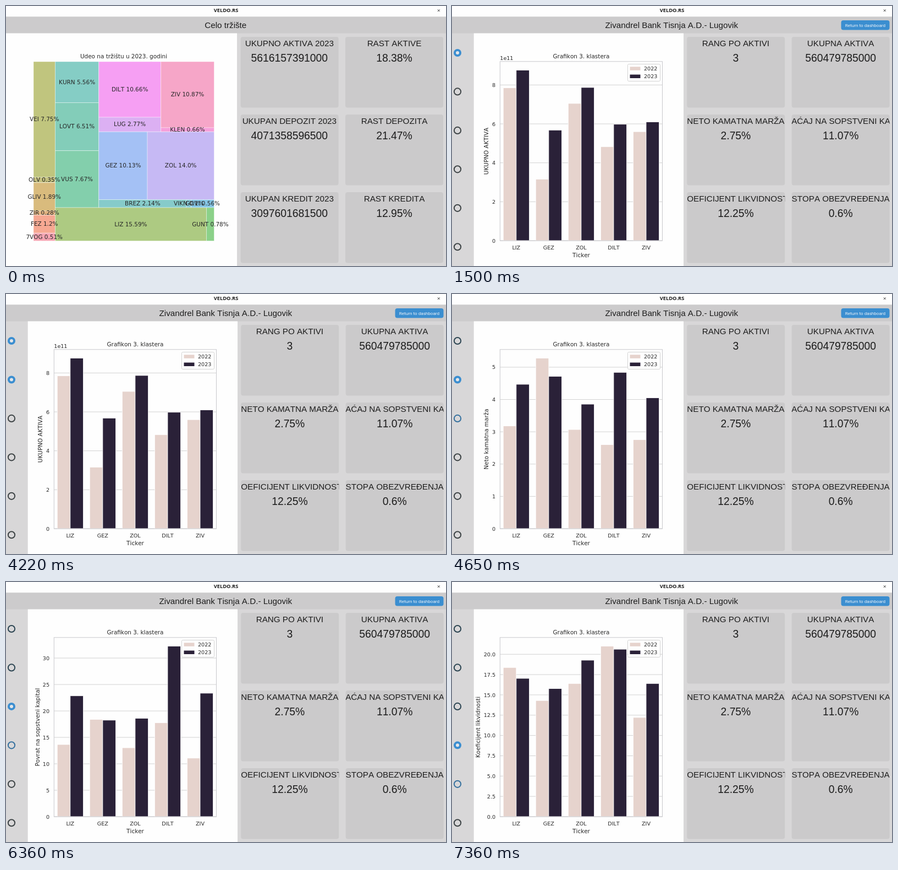
An HTML page with a canvas that plays this animation: 800 by 472 pixels, repeating every 8000 ms.

```html
<!DOCTYPE html>
<html lang="sr">
<head>
<meta charset="utf-8">
<title>Dashboard</title>
<style>
html, body { margin: 0; width: 100%; height: 100%; overflow: hidden; background: #fdfdfd; }
canvas { display: block; }
</style>
</head>
<body>
<canvas id="stage" width="800" height="472"></canvas>
<script>
const ctx = document.getElementById('stage').getContext('2d');
const LOOP = 8000;
const SANS = '"Liberation Sans", Arial, sans-serif';
const PLOT = '"DejaVu Sans", sans-serif';
const LIGHT = '#e6d3cd', DARK = '#2a2138', BLUE = '#3b8ed0', INK = '#262626';
const TICKERS = ['LIZ', 'GEZ', 'ZOL', 'DILT', 'ZIV'];

// name, share, left, top, right, bottom, colour
const TILES = [
  ['VEI', '7.75', 50, 101, 89.4, 311, '#c0c57e'],
  ['OLV', '0.35', 50, 311, 89.4, 320.7, '#c4c07e'],
  ['GLIV', '1.89', 50, 320.7, 89.4, 372, '#d9bb7d'],
  ['ZIR', '0.28', 50, 372, 89.4, 379.6, '#e0b280'],
  ['FEZ', '1.2', 50, 379.6, 89.4, 412.2, '#f6a892'],
  ['7VOG', '0.51', 50, 412.2, 89.4, 426.5, '#f6a5b3'],
  ['KURN', '5.56', 89.4, 101, 168.7, 175.5, '#85cdc5'],
  ['LOVT', '6.51', 89.4, 175.5, 168.7, 262.7, '#83cdb9'],
  ['VUS', '7.67', 89.4, 262.7, 168.7, 366, '#83cfac'],
  ['DILT', '10.66', 168.7, 101, 281.5, 202, '#f69ff3'],
  ['LUG', '2.77', 168.7, 202, 281.5, 228.3, '#dcb0f3'],
  ['ZIV', '10.87', 281.5, 101, 378.4, 221, '#f8b1d0'],
  ['KLEN', '0.66', 281.5, 221, 378.4, 228.3, '#f69fda'],
  ['GEZ', '10.13', 168.7, 228.3, 257, 351.6, '#a4c1f5'],
  ['ZOL', '14.0', 257, 228.3, 378.4, 351.6, '#c6b9f4'],
  ['BREZ', '2.14', 168.7, 351.6, 328, 366, '#86cbca'],
  ['VIKN', '0.1', 328, 351.6, 336.5, 366, '#86c8d6'],
  ['GOVI', '0.56', 336.5, 351.6, 378.4, 366, '#86c6e6'],
  ['LIZ', '15.59', 89.4, 366, 364.5, 426.5, '#adca82'],
  ['GUNT', '0.78', 364.5, 366, 378.4, 426.5, '#8bd189']
];

const CHARTS = [
  { at: 1500, label: 'UKUPNO AKTIVA', x: 62, step: 2, digits: 0, exp: '1e11',
    values: [7.85, 8.76, 3.16, 5.68, 7.05, 7.87, 4.83, 5.98, 5.6, 6.1] },
  { at: 4360, label: 'Neto kamatna marža', x: 62, step: 1, digits: 0,
    values: [3.18, 4.47, 5.28, 4.715, 3.07, 3.855, 2.6, 4.84, 2.755, 4.05] },
  { at: 5650, label: 'Povrat na sopstveni kapital', x: 56.5, step: 5, digits: 0,
    values: [13.65, 22.85, 18.4, 18.25, 13.03, 18.6, 17.75, 32.25, 11.07, 23.35] },
  { at: 6930, label: 'Koeficijent likvidnosti', x: 47, step: 2.5, digits: 1,
    values: [18.37, 17.03, 14.3, 15.77, 16.4, 19.27, 21, 20.62, 12.22, 16.4] }
];
const HOVERS = [0, 3220, 4650, 6360, 7360];
const SELECTS = [1500, 4220, 5650, 6930];

const MARKET = [
  ['UKUPNO AKTIVA 2023', '5616157391000'], ['RAST AKTIVE', '18.38%'],
  ['UKUPAN DEPOZIT 2023', '4071358596500'], ['RAST DEPOZITA', '21.47%'],
  ['UKUPAN KREDIT 2023', '3097601681500'], ['RAST KREDITA', '12.95%']
];
const BANK = [
  ['RANG PO AKTIVI', '3'], ['UKUPNA AKTIVA', '560479785000'],
  ['NETO KAMATNA MARŽA', '2.75%'], ['POVRAĆAJ NA SOPSTVENI KAPITAL', '11.07%'],
  ['KOEFICIJENT LIKVIDNOSTI', '12.25%'], ['STOPA OBEZVREĐENJA', '0.6%']
];

function rect(x, y, w, h, color) {
  ctx.fillStyle = color;
  ctx.fillRect(x, y, w, h);
}

function round(x, y, w, h, r, color) {
  ctx.beginPath();
  ctx.roundRect(x, y, w, h, r);
  ctx.fillStyle = color;
  ctx.fill();
}

function frame(x, y, w, h, color, width = 1) {
  ctx.strokeStyle = color;
  ctx.lineWidth = width;
  ctx.strokeRect(x, y, w, h);
}

function text(str, x, y, font, align = 'center', color = '#1c1c1c') {
  ctx.font = font;
  ctx.textAlign = align;
  ctx.fillStyle = color;
  ctx.fillText(str, x, y);
}

function circle(x, y, r, fill, stroke) {
  ctx.beginPath();
  ctx.arc(x, y, r, 0, 7);
  if (fill) { ctx.fillStyle = fill; ctx.fill(); }
  if (stroke) { ctx.strokeStyle = stroke; ctx.lineWidth = 2; ctx.stroke(); }
}

function line(x1, y1, x2, y2, color) {
  ctx.beginPath();
  ctx.moveTo(x1, y1);
  ctx.lineTo(x2, y2);
  ctx.strokeStyle = color;
  ctx.lineWidth = 1;
  ctx.stroke();
}

function drawTreemap(t) {
  text('Udeo na tržištu u 2023. godini', 214, 95, `10.44px ${PLOT}`, 'center', INK);
  for (const [name, , x, y, r, b, color] of TILES) {
    rect(x, y, r - x, b - y, name === 'ZIV' && t < 500 ? '#f6a6c8' : color);
    frame(x, y, r - x, b - y, 'rgba(255,255,255,.5)', 0.8);
  }
  for (const [name, share, x, y, r, b] of TILES)
    text(`${name} ${share}%`, (x + r) / 2, (y + b) / 2 + 3.3, `10.44px ${PLOT}`, 'center', INK);
}

function drawChart({ label, x, step, digits, exp, values }) {
  const left = 87.3, right = 382.5, base = 426, height = 325;
  const top = Math.max(...values) * 1.05;
  const yOf = v => base - v / top * height;
  const slot = (right - left) / 5, bar = slot * 0.4;
  const small = `9.57px ${PLOT}`, large = `10.44px ${PLOT}`;

  for (let v = 0; v < top; v += step) {
    line(left, yOf(v), right, yOf(v), '#d2d2d2');
    text(v.toFixed(digits), 79, yOf(v) + 3.6, small, 'right', INK);
  }
  values.forEach((v, i) => {
    const bx = left + slot * ((i >> 1) + 0.1) + (i % 2) * bar;
    rect(bx, yOf(v), bar, base - yOf(v), i % 2 ? DARK : LIGHT);
    frame(bx, yOf(v), bar, base - yOf(v), '#fff', 0.8);
  });
  frame(left, 100.8, right - left, base - 100.8, '#c8c8cc');

  TICKERS.forEach((name, i) => text(name, left + slot * (i + 0.5), 441.8, small, 'center', INK));
  text('Ticker', 235, 456, large, 'center', INK);
  text('Grafikon 3. klastera', 235, 95, large, 'center', INK);
  if (exp) text(exp, 87.3, 97.5, small, 'left', INK);

  ctx.save();
  ctx.translate(x, 263.5);
  ctx.rotate(-Math.PI / 2);
  text(label, 0, 4, large, 'center', INK);
  ctx.restore();

  round(319.5, 105.5, 59, 31, 2, 'rgba(255,255,255,.8)');
  ctx.strokeStyle = '#d2d2d2';
  ctx.lineWidth = 1;
  ctx.stroke();
  [['2022', LIGHT], ['2023', DARK]].forEach(([year, color], i) => {
    rect(323.5, 110.3 + i * 14.2, 19, 6.5, color);
    text(year, 349, 117 + i * 14.2, small, 'left', INK);
  });
}

function drawRadios(t, chart) {
  for (let i = 0; i < 6; i++) {
    const y = 85 + i * 70.45;
    const on = i === chart || (t >= SELECTS[i] && i > chart);
    if (on) {
      circle(10, y, 7, BLUE);
      circle(10, y, 3, '#e4e6e8');
    } else {
      const color = i < chart ? '#2c4552' : t >= HOVERS[i] ? '#36719f' : '#3e4446';
      circle(10, y, 6.1, null, color);
    }
  }
}

function drawCards(cards, shift) {
  cards.forEach(([title, value], i) => {
    const x = (i % 2 ? 617 : 426.6) + shift, y = 56 + (i >> 1) * 141;
    const mid = (i % 2 ? 706 : 515.3) + shift;
    ctx.save();
    round(x, y, 178, 128.5, 4, '#cbcacb');
    ctx.clip();
    text(title, mid, y + 17.3, `15.2px ${SANS}`);
    text(value, mid, y + 45.2, `19.3px ${SANS}`);
    ctx.restore();
  });
}

function draw(t) {
  const chart = CHARTS.filter(c => t >= c.at).length - 1;
  const detail = chart >= 0;
  ctx.fontKerning = 'none';
  rect(0, 0, 800, 472, '#d8d7d8');
  rect(0, 0, 800, 19.5, '#fefefe');
  text('VELDO.RS', 400, 11.2, 'bold 9.3px "Noto Sans", sans-serif');
  line(784.8, 6.3, 788.6, 10.1, '#333');
  line(788.6, 6.3, 784.8, 10.1, '#333');
  rect(0, 19.5, 800, 30, '#cccbcc');
  text(detail ? 'Zivandrel Bank Tisnja A.D.- Lugovik' : 'Celo tržište', 399.3, 39.8, `15.2px ${SANS}`);

  if (detail) {
    round(707.5, 26, 88, 17.5, 4, BLUE);
    text('Return to dashboard', 751.5, 37.6, '8.1px Roboto, sans-serif', 'center', '#eef3f8');
    rect(39.7, 49.5, 381.3, 423, '#fefefe');
    drawRadios(t, chart);
    drawChart(CHARTS[chart]);
  } else {
    rect(0, 49.5, 420, 423, '#fefefe');
    drawTreemap(t);
  }
  drawCards(detail ? BANK : MARKET, detail ? 0.6 : 0);
}

const start = performance.now();
function tick() {
  draw((performance.now() - start) % LOOP);
  requestAnimationFrame(tick);
}
tick();
</script>
</body>
</html>
```
